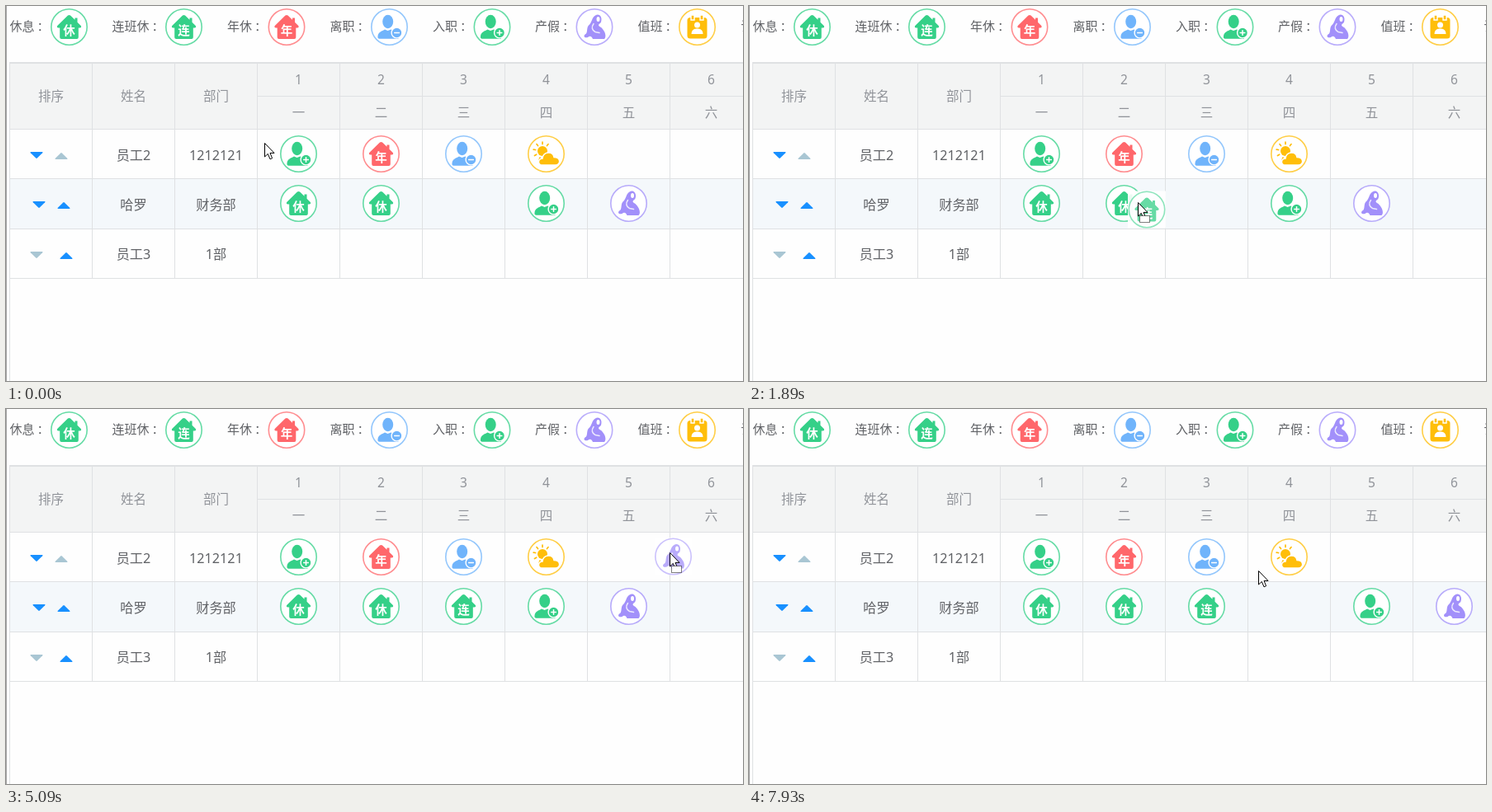
Write an HTML page that moves like this. It is 893 px wide and 455 px high and loops after 8 s.

```html
<!DOCTYPE html>
<html lang="zh-CN">
<head>
<meta charset="utf-8">
<style>
html, body { margin: 0; width: 100%; height: 100%; overflow: hidden; background: #fefefe; }
svg { display: block; font-family: "Noto Sans", "Noto Sans CJK SC", sans-serif; }
.label { font-size: 15px; fill: #606266; }
.head { font-size: 15.5px; fill: #909399; text-anchor: middle; }
.cell { font-size: 16.2px; fill: #606266; text-anchor: middle; }
.mark { font-size: 14.5px; font-weight: bold; fill: #fff; text-anchor: middle; }
.ring { fill: #fff; stroke: currentColor; stroke-width: 1.6; stroke-opacity: .75; }
.gap { stroke: #fff; stroke-width: 1.4; }
.white { fill: none; stroke: #fff; stroke-width: 1.5; stroke-linecap: round; }
.cursor path { fill: #fff; stroke: #000; stroke-linejoin: round; }
</style>
</head>
<body>
<svg id="stage" width="893" height="455" viewBox="0 0 893 455"></svg>
<script>
const LOOP = 8000;
const GREEN = '#35d088', RED = '#ff676b', BLUE = '#70b4fb', PURPLE = '#a290fa', YELLOW = '#ffbe0a';
const stage = document.getElementById('stage');

const house = mark => `<path d="M-14.3-1.4L-1.6-14Q0-15.2 1.6-14L7-8.8V-11H10V-5.8L14.3-1.4Q15.4.8 13 1H11.3V12.5Q11.3 14.5 9.3 14.5H-9.3Q-11.3 14.5-11.3 12.5V1H-13Q-15.4.8-14.3-1.4Z"/>
  <text class="mark" y="9.7">${mark}</text>`;
const person = sign => `<ellipse cx="-1.8" cy="-6.5" rx="6.5" ry="8.2"/>
  <path d="M-12 14.3Q-14.5 14.3-14 11C-13.5 6-9 5-5.5 3L-2 4.5 2 3C6 5 11 5 11 14.3Z"/>
  <circle class="gap" cx="9" cy="7" r="6.4"/><path class="white" d="${sign}"/>`;
const minus = 'M6.2 7H11.8', plus = minus + 'M9 4.2V9.8';
const mother = `<path d="M1-14C6-17 10-12 8-6C7-4 5-4 5-2C6 0 9 0 11 4C14 8 14 13 12 14.5H-2C-3 12-5 10-8 12.5C-13 14-14 10-10 8C-8 5-10 0-6-3C-3-6-3-12 1-14Z"/>
  <ellipse cx="4.5" cy="-9.5" rx="2" ry="3" fill="#fff"/>
  <path class="white" stroke-opacity=".8" d="M-1-4C-4 0-3 4 1 6L6 7"/>`;
const rays = [110, 150, 190, 230, 270, 310].map(a => `<path stroke="currentColor" stroke-width="1.7" stroke-linecap="round" d="M8.5 0H11" transform="translate(-4.5 -3.5) rotate(${a})"/>`).join('');
const weather = `<circle cx="-4.5" cy="-3.5" r="6"/>${rays}
  <path class="gap" d="M-4.5 13.5C-10.5 13.5-10.5 6-4.5 5.5C-3.5-3 8-4 9.5 4C18 4 18 13.5 11 13.5Z"/>`;
const badge = `<rect x="-12" y="-11.5" width="24" height="25.5" rx="3.5"/>
  <path class="gap" d="M-7.5-14.5H-3.5V-8.5H-7.5ZM3.5-14.5H7.5V-8.5H3.5Z"/>
  <circle cy="-2.5" r="3.5" fill="#fff"/><path fill="#fff" d="M-7 8.5C-7 3-3 2 0 2S7 3 7 8.5Z"/>`;

const icons = {
  rest: [GREEN, house('休')], series: [GREEN, house('连')], annual: [RED, house('年')],
  leave: [BLUE, person(minus)], join: [GREEN, person(plus)], mother: [PURPLE, mother],
  weather: [YELLOW, weather], duty: [YELLOW, badge]
};
const icon = (name, x, y, id = '') =>
  `<use ${id && `id="${id}"`} href="#${name}" x="${x}" y="${y}" color="${icons[name][0]}" fill="${icons[name][0]}"/>`;
const text = (cls, x, y, s) => `<text class="${cls}" x="${x}" y="${y}">${s}</text>`;
const line = d => `<path d="${d}" stroke="#dfe1e3" fill="none"/>`;
const caret = (x, y, up, on) => `<path transform="translate(${x} ${y}) scale(1 ${up ? -1 : 1})" fill="${on ? '#1890ff' : '#a9c6d3'}" d="M-6.9-4H6.9Q8.2-3.7 7.2-2.7L.8 3.6Q0 4.2-.8 3.6L-7.2-2.7Q-8.2-3.7-6.9-4Z"/>`;
const column = i => 254.5 + 100 * i;

let art = '<defs>';
for (const [name, [, body]] of Object.entries(icons))
  art += `<g id="${name}"><circle class="ring" r="21.7"/>${body}</g>`;
art += `</defs><rect width="893" height="455" fill="#fefefe"/>
  <path d="M.5 0V455" stroke="#a5a5a5"/>
  <rect x="4" y="69" width="889" height="80" fill="#f3f4f4"/>
  <rect x="4" y="210" width="889" height="60" fill="#f4f8fb"/>`;
art += line('M4 68.5H893M4 69.5H893M4.5 69V455M304 109.5H893M4 149.5H893M4 209.5H893M4 270.5H893M4 330.5H893');
for (let x = 104.5; x < 893; x += 100) art += line(`M${x} 69V330`);

[['休息', 4.5, 'rest'], ['连班休', 128.5, 'series'], ['年休', 268, 'annual'], ['离职', 392.5, 'leave'],
 ['入职', 517, 'join'], ['产假', 641, 'mother'], ['值班', 765.5, 'duty'], ['请假', 890.5]].forEach(([s, x, name]) => {
  const end = x + 15 * s.length;
  art += text('label', x, 30, s) + text('label', end + 3, 30, '：');
  if (name) art += icon(name, end + 42, 25.5);
});

['排序', '姓名', '部门'].forEach((s, i) => art += text('head', 54.5 + 100 * i, 115, s));
[...'一二三四五六'].forEach((s, i) =>
  art += text('head', column(i + 1), 95, i + 1) + text('head', column(i + 1), 135, s));
[['员工2', '1212121', 186.5], ['哈罗', '财务部', 246.5], ['员工3', '1部', 307]].forEach(([a, b, y]) =>
  art += text('cell', 154.5, y, a) + text('cell', 254.5, y, b));
art += caret(37, 181, 0, 1) + caret(67, 182, 1, 0) + caret(40, 241, 0, 1) +
  caret(70, 242, 1, 1) + caret(37, 302, 0, 0) + caret(73, 303, 1, 1);

['join', 'annual', 'leave', 'weather'].forEach((name, i) => art += icon(name, column(i + 1), 179.5));

// Second row: [icon, column, visible from, visible until]
const cells = [['rest', 1], ['rest', 2], ['series', 3, 3030], ['join', 4, 0, 6620],
  ['mother', 5, 0, 7290], ['join', 5, 7290], ['mother', 6, 5345]];
cells.forEach(([name, col], i) => art += icon(name, column(col), 239.5, 'cell' + i));

art += `<g id="ghost"><rect x="-23" y="-22.5" width="46" height="45" fill="#fff" opacity=".9"/>
    <use id="ghostIcon" opacity=".75"/></g>
  <g id="pointer" class="cursor">
    <path id="arrow" d="M.5.5V17L4.3 13.4 7 19.8 9.6 18.7 7 12.4H12Z"/>
    <path id="hand" transform="translate(-5.5 -1)" d="M4.2 2.8Q5.8.2 7.4 2.8V9Q9.8 8 10.5 9.8Q12.8 9 13.5 10.8Q16.5 10.3 16.5 13V16.5L14.5 20V23H7V20.5L1.2 14.5Q.2 11.5 2.5 11.6L4.2 13.5ZM7.4 9V13M10.5 9.8V13M13.5 10.8V13.5"/>
    <path id="box" d="M2.5 16.5H14.5V24.5H2.5Z" stroke-dasharray="1 1"/>
  </g>`;
stage.innerHTML = art;

// Each pose letter is one step: a arrow, h hand, d dragging, r ghost with a plain arrow.
// Path knots are [step, x, y].
const moves = [
  { from: 0, to: 1, poses: 'a', path: [[0, 313, 166]] },
  { from: 150, to: 1100, poses: 'aaaaaahh', path: [[0, 318, 152], [2, 300, 118], [5, 186, 72], [6, 173, 28], [7, 211, 20]] },
  { from: 1230, to: 2040, poses: 'ddddddd', item: 'series', grip: [11, 9], path: [[0, 225, 40], [2, 312, 118], [5, 471, 238], [6, 452, 230]] },
  { from: 2500, to: 3440, poses: 'dddraaaa', item: 'series', grip: [8.5, 9.5], path: [[0, 475, 185], [1, 530, 149], [2, 588, 200], [3, 547, 243], [4, 550, 250], [6, 590, 325], [7, 566, 285]] },
  { from: 3580, to: 4540, poses: 'aaaaaaah', path: [[0, 570, 262], [3, 602, 110], [5, 618, -2], [6, 670, 6], [7, 709, 21]] },
  { from: 4820, to: 5750, poses: 'ddddhaaa', item: 'mother', grip: [4.5, 5], path: [[0, 722, 50], [3, 845, 236], [4, 840, 240], [6, 745, 302], [7, 705, 311]] },
  { from: 5910, to: 6320, poses: 'aaah', path: [[0, 657, 290], [3, 662, 242]] },
  { from: 6620, to: 7010, poses: 'dddd', item: 'join', grip: [-7, -2], path: [[0, 675, 246], [2, 740, 257], [3, 747, 253]] },
  { from: 7290, to: 7291, poses: 'h', path: [[0, 737, 250]] },
  { from: 7570, to: 7930, poses: 'aaaa', path: [[0, 722, 270], [1, 690, 296], [3, 617, 196]] }
];

const el = id => document.getElementById(id);
const show = (id, on) => el(id).style.display = on ? '' : 'none';

function along(path, step) {
  const i = Math.max(1, path.findIndex(p => p[0] >= step));
  const a = path[i - 1], b = path[i] || a;
  const k = b === a ? 0 : (step - a[0]) / (b[0] - a[0]);
  return [a[1] + (b[1] - a[1]) * k, a[2] + (b[2] - a[2]) * k].map(Math.round);
}

function draw(t) {
  cells.forEach(([, , from = 0, until = LOOP], i) => show('cell' + i, t >= from && t < until));
  const { from, to, poses, path, item, grip } = moves.filter(m => m.from <= t).pop();
  const last = poses.length - 1;
  const step = Math.min(last, Math.floor((t - from) / (to - from) * last + .15));
  const [x, y] = along(path, step), pose = poses[step];
  const dragging = pose === 'd' || pose === 'r';
  el('pointer').setAttribute('transform', `translate(${x} ${y})`);
  show('hand', pose === 'h');
  show('arrow', pose !== 'h');
  show('box', pose === 'd');
  show('ghost', dragging);
  if (dragging) {
    el('ghost').setAttribute('transform', `translate(${x + grip[0]} ${y + grip[1]})`);
    const ghost = el('ghostIcon');
    ghost.setAttribute('href', '#' + item);
    ghost.setAttribute('fill', icons[item][0]);
    ghost.setAttribute('color', icons[item][0]);
  }
}

const start = performance.now();
(function tick() {
  draw((performance.now() - start) % LOOP);
  requestAnimationFrame(tick);
})();
</script>
</body>
</html>
```
